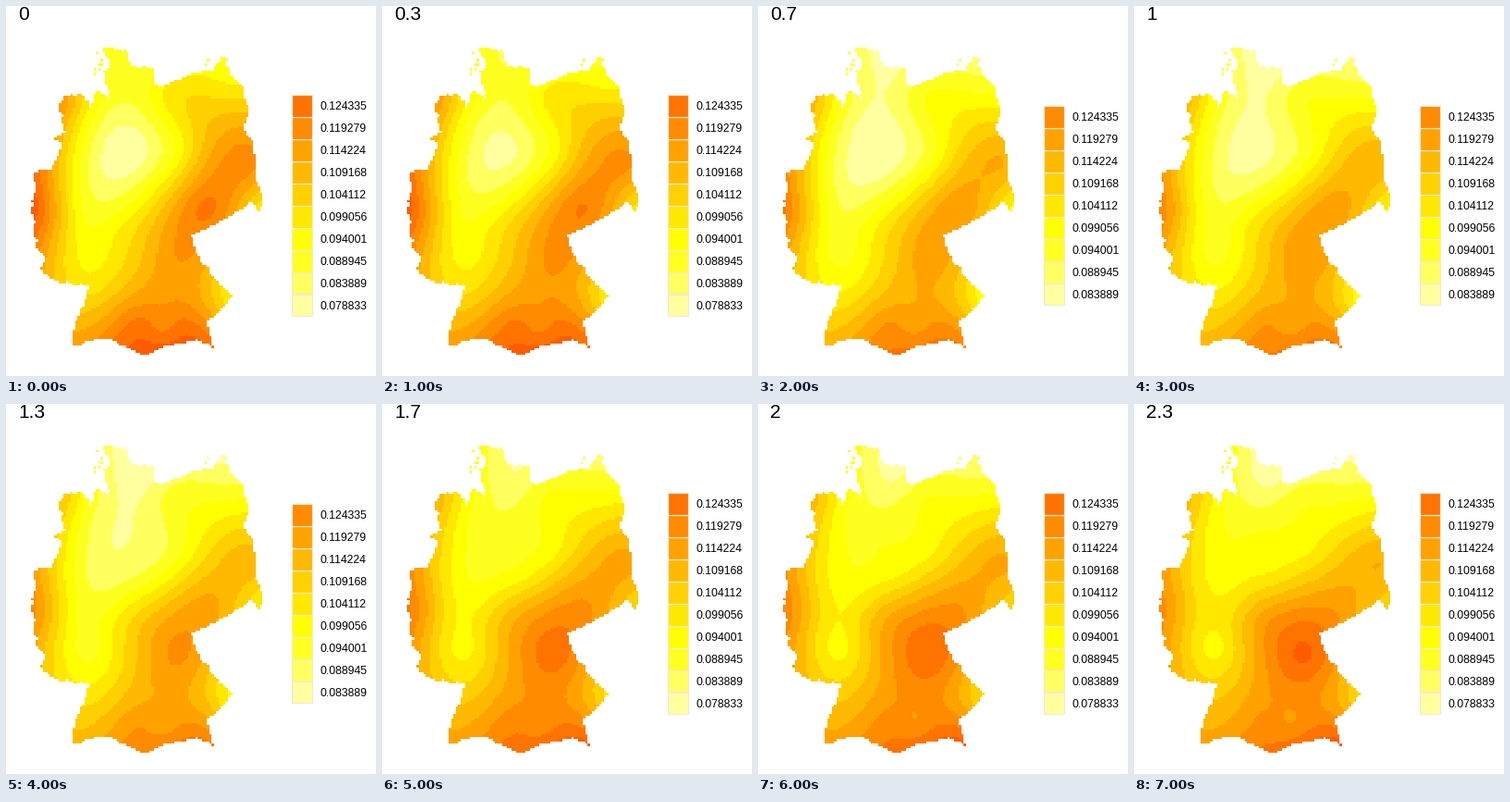
A matplotlib script for the animation above (8000 ms loop, 400 by 400 pixels).

```python
import numpy as np
import matplotlib.pyplot as plt
from matplotlib.animation import FuncAnimation
from matplotlib.patches import Rectangle
from matplotlib.path import Path

SIZE, DPI, CELL = 400, 100, 2.5
FRAMES, INTERVAL = 8, 1000
PALE_FRAMES = (2, 3, 4)          # here the lowest class is missing
LOWEST, STEP = 0.0788334, 0.005055735

plt.rcParams["font.family"] = ["Liberation Sans", "DejaVu Sans"]

# Heat ramp: whitish yellows, then pure yellow towards red.
pale = [(1, 1, s / 8) for s in (5, 3, 1)]
warm = [(1, 1 - k / 11, 0) for k in range(8)]
COLORS = np.array(pale + warm)

# Corners of the border, clockwise; the ragged detail in between is random.
CORNERS = [
    (104, 44), (130, 48), (137, 66), (161, 69), (159, 84), (168, 88),
    (198, 75), (226, 68), (236, 54), (243, 74), (258, 88), (262, 120),
    (256, 130), (267, 146), (270, 186), (279, 207), (274, 222), (265, 211),
    (258, 219), (220, 239), (200, 249), (211, 277), (245, 315), (226, 336),
    (217, 343), (224, 370), (207, 361), (172, 368), (149, 378), (110, 359),
    (72, 368), (75, 342), (90, 304), (48, 296), (38, 284), (43, 274),
    (33, 262), (28, 218), (33, 195), (29, 179), (51, 177), (61, 152),
    (52, 144), (64, 138), (57, 108), (63, 97), (83, 96), (92, 111), (98, 91),
    (112, 100), (107, 76), (112, 62)]

# Peaks, hollows and slopes of the surface: x, y, first and last level.
ANCHORS = np.array([
    (110, 50, 2.6, 2.1), (145, 78, 2.5, 0.5), (66, 105, 7.2, 5.7),
    (88, 125, 3.4, 3.4), (180, 100, 4.6, 2.6), (240, 88, 4.2, 2.1),
    (215, 120, 5.7, 3.4), (136, 155, 0.2, 3.5), (97, 188, 1.5, 3.5),
    (150, 186, 2.0, 4.2), (185, 160, 3.3, 3.8), (266, 172, 8.4, 7.0),
    (270, 212, 5.3, 5.8), (218, 218, 9.3, 7.8), (40, 222, 9.3, 7.6),
    (66, 195, 4.8, 4.8), (86, 228, 2.9, 4.2), (88, 264, 3.5, 3.6),
    (115, 242, 3.7, 5.8), (140, 228, 4.3, 7.3), (50, 280, 6.2, 6.2),
    (95, 305, 4.6, 5.5), (185, 274, 8.0, 10.2), (150, 275, 6.2, 8.6),
    (243, 318, 4.2, 5.2), (82, 362, 7.6, 7.3), (146, 345, 9.5, 8.4),
    (170, 345, 8.5, 8.0), (190, 345, 9.4, 8.6), (215, 366, 10.0, 10.5)])

rng = np.random.default_rng(4)
sites = ANCHORS[:, :2] / 100
n = int(SIZE / CELL)
mid = (np.arange(n) + 0.5) * CELL
cells = np.stack(np.meshgrid(mid, mid), axis=-1).reshape(-1, 2)


def ragged(corners, step=4, rough=1.0):
    """Split each side into short pieces and shake the new points."""
    points = []
    for a, b in zip(corners, corners[1:] + corners[:1]):
        count = max(1, round(np.hypot(b[0] - a[0], b[1] - a[1]) / step))
        side = np.linspace(a, b, count, endpoint=False)
        side[1:] += rng.normal(0, rough, side[1:].shape)
        points.extend(side)
    return points


def land_mask():
    inside = Path(ragged(CORNERS)).contains_points(cells)
    # Small islands off the two northern coasts.
    for low, high in (((96, 44), (107, 76)), ((214, 59), (244, 68))):
        for spot in rng.uniform(low, high, (8, 2)):
            inside |= np.abs(cells - spot).max(axis=1) < CELL / 2
    return inside


def plate(points):
    """Thin-plate kernel and plane terms at the given points."""
    d2 = ((points[:, None] - sites[None]) ** 2).sum(axis=2)
    kernel = d2 * np.log(d2 + 1e-12)
    return np.hstack([kernel, np.ones((len(points), 1)), points])


rows = plate(sites)
system = np.vstack([rows, np.pad(rows[:, len(sites):].T, ((0, 0), (0, 3)))])
levels = np.vstack([ANCHORS[:, 2:], np.zeros((3, 2))])
land = land_mask()
first, last = (plate(cells[land] / 100) @ np.linalg.solve(system, levels)).T


def map_image(frame, shift):
    surface = first + (last - first) * frame / (FRAMES - 1)
    classes = np.floor(surface - shift).astype(int)
    pixels = np.ones((n * n, 3))
    pixels[land] = COLORS[classes.clip(0, len(COLORS) - 1)]
    return pixels.reshape(n, n, 3)


def text(x, y, label, px):
    return ax.text(x, y, label, fontsize=px * 72 / DPI, color="black",
                   va="baseline", ha="left")


def make_legend(shift):
    count, pitch = 10 - shift, 23.95
    top = 215.7 - count * pitch / 2
    parts = []
    for k in range(count):
        y = top + (count - 1 - k) * pitch
        box = Rectangle((308.5, y), 22, pitch, fc=COLORS[k], ec="#f5e9d3",
                        lw=1.2 * 72 / DPI)
        parts.append(ax.add_patch(box))
        parts.append(text(339, y + pitch / 2 + 4.3,
                          f"{LOWEST + (k + shift) * STEP:.6f}", 12.3))
    return parts


fig = plt.figure(figsize=(SIZE / DPI, SIZE / DPI), dpi=DPI, facecolor="white")
ax = fig.add_axes([0, 0, 1, 1])
picture = ax.imshow(np.ones((n, n, 3)), extent=(0, SIZE, SIZE, 0),
                    interpolation="nearest")
ax.set(xlim=(0, SIZE), ylim=(SIZE, 0))
ax.axis("off")
title = text(13, 14.6, "0", 21)
legends = [make_legend(0), make_legend(1)]


def draw(frame):
    shift = int(frame in PALE_FRAMES)
    picture.set_data(map_image(frame, shift))
    title.set_text(f"{round(frame / 3, 1):g}")
    for k, parts in enumerate(legends):
        for part in parts:
            part.set_visible(k == shift)
    return [picture, title, *legends[0], *legends[1]]


anim = FuncAnimation(fig, draw, frames=FRAMES, interval=INTERVAL,
                     init_func=lambda: draw(0), repeat=True, repeat_delay=0)
plt.show()
```
